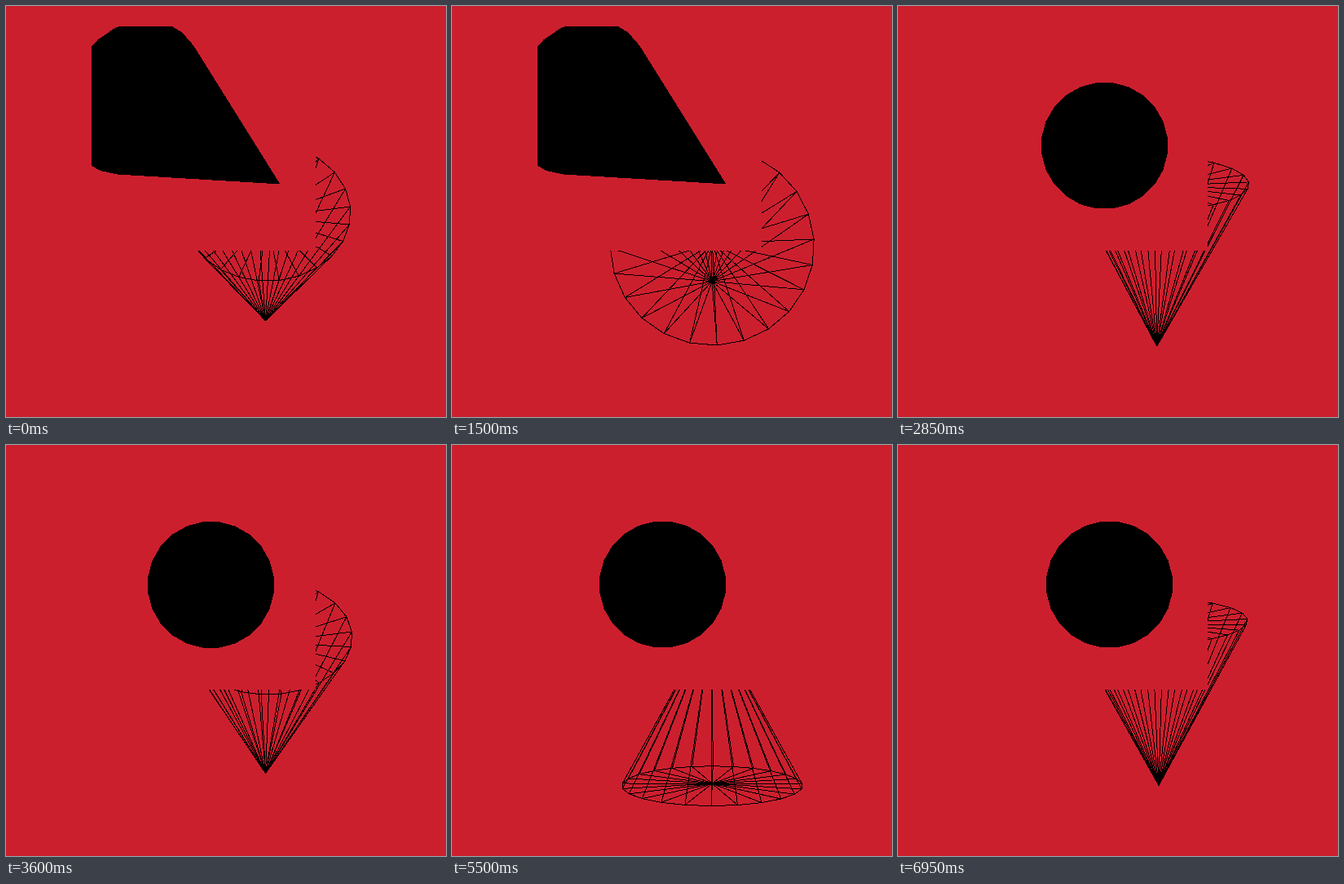
Recreate the animation shown at these times as an HTML page. Size 540x504 px, loop 7 s.

```html
<!DOCTYPE html>
<html lang="en">
<head>
<meta charset="utf-8">
<title>Cones</title>
<style>
  html, body { margin: 0; width: 100%; height: 100%; overflow: hidden; background: #cc1f2e; }
  svg { display: block; width: 540px; height: 504px; }
</style>
</head>
<body>
<svg viewBox="0 0 540 504" shape-rendering="crispEdges">
  <clipPath id="panel"><rect x="105" y="25" width="275" height="275"/></clipPath>
  <path id="wire" fill="none" stroke="#000" stroke-width="1"/>
  <rect x="80" width="300" height="300" fill="#cc1f2e"/>
  <path id="solid" clip-path="url(#panel)"/>
</svg>
<script>
const STEP = 50, STEPS = 140, SIDES = 24;
const RAD = Math.PI / 180;
const wire = document.getElementById('wire');
const solid = document.getElementById('solid');

// step, tilt, roll, facet phase (degrees), disc x, disc y
const KEYS = [
  [0, 51, 0.7, 5.3, 258, 171],
  [18, 582, -0.6, 2.8, 257, 171],
  [42, 1424.5, 1.3, 3, 255.5, 171],
  [72, 2197, 0.5, 3.7, 251.5, 171.5],
  [88, 2828, 0.2, 1.5, 244.5, 172],
  [110, 3413.7, 0, 0.5, 258.5, 171],
  [139, 4328, -0.4, 3.7, 259.5, 171]
];

// Solid cone: apex x, apex y, axis angle, axis length, base radii across and along the axis
const CONE_FROM = [336.5, 218.5, -149.3, 209, 99.5, 80];
const CONE_TO = [289.5, 251, -117.8, 220, 119, 68];
const CYCLE = 15, CONE_STEPS = 4;

const mix = (a, b, k) => a.map((v, i) => v + (b[i] - v) * k);
const pt = p => p[0].toFixed(2) + ' ' + p[1].toFixed(2);
const line = (a, b) => 'M' + pt(a) + 'L' + pt(b);
const poly = pts => 'M' + pts.map(pt).join('L') + 'Z';
const ring = (phase, fn) =>
  Array.from({ length: SIDES }, (_, i) => fn((i * 360 / SIDES + phase) * RAD));

function poseAt(step) {
  let i = 0;
  while (i < KEYS.length - 2 && step >= KEYS[i + 1][0]) i++;
  const a = KEYS[i], b = KEYS[i + 1];
  return mix(a, b, (step - a[0]) / (b[0] - a[0]));
}

function wirePath(tilt, roll, phase) {
  const R = 111.5, H = 100, D = 900, X = 319.3, Y = 317;
  const c = Math.cos(tilt * RAD), s = Math.sin(tilt * RAD);
  const cr = Math.cos(roll * RAD), sr = Math.sin(roll * RAD);
  const project = (x, y, z) => {
    const k = D / (D - z);
    return [X + (x * cr - y * sr) * k, Y + (x * sr + y * cr) * k];
  };
  const apex = project(0, H * c, H * s);
  const hub = project(0, -H * c, -H * s);
  const rim = ring(phase, a => {
    const v = R * Math.sin(a);
    return project(R * Math.cos(a), -H * c + v * s, -H * s - v * c);
  });
  return poly(rim) + rim.map(p => line(p, apex) + line(p, hub)).join('');
}

function conePath([ax, ay, angle, len, across, along]) {
  const c = Math.cos(angle * RAD), s = Math.sin(angle * RAD);
  const place = (u, v) => [ax + u * c - v * s, ay + u * s + v * c];
  const base = ring(7.5, a => place(len + along * Math.cos(a), across * Math.sin(a)));
  // Tangent points from the apex to the base ellipse
  const u = len - along * along / len;
  const v = across * Math.sqrt(1 - (along / len) ** 2);
  return poly(base) + poly([[ax, ay], place(u, -v), place(u, v)]);
}

function discPath(x, y) {
  const r = 77.9;
  return poly(ring(7.5, a => [x + r * Math.cos(a), y + r * Math.sin(a)]));
}

function draw(step) {
  const [, tilt, roll, phase, x, y] = poseAt(step);
  const beat = step % CYCLE;
  wire.setAttribute('d', wirePath(tilt, roll, phase));
  solid.setAttribute('d', beat < CONE_STEPS
    ? conePath(mix(CONE_FROM, CONE_TO, beat / (CONE_STEPS - 1)))
    : discPath(x, y));
}

const start = performance.now();
function tick() {
  draw(Math.floor((performance.now() - start) / STEP) % STEPS);
  requestAnimationFrame(tick);
}
tick();
</script>
</body>
</html>
```
